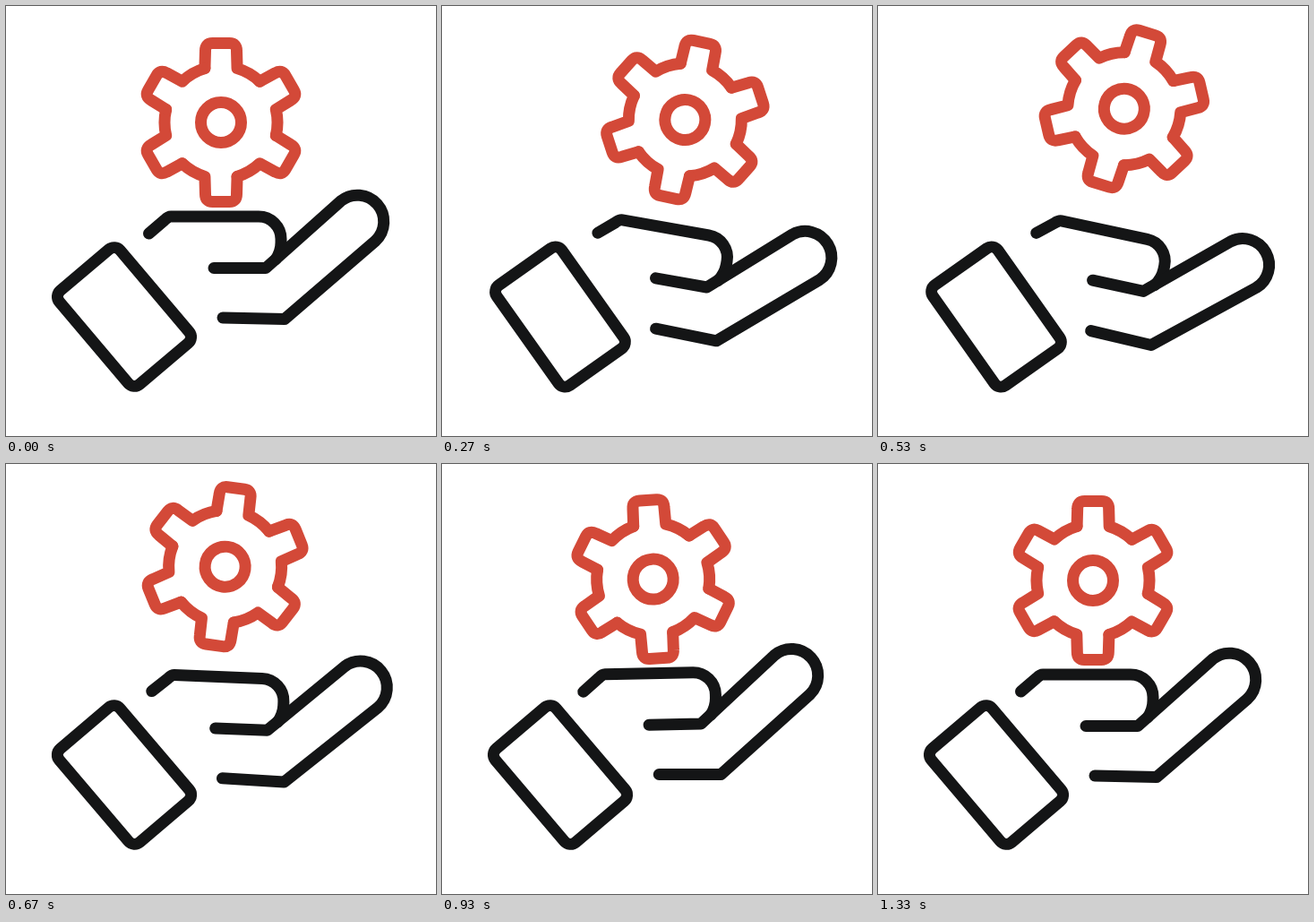
An HTML page that plays this animation: 480x480 px, repeating every 1530 ms.

```html
<!DOCTYPE html>
<html lang="en">
<head>
<meta charset="utf-8">
<title>Hand and gear</title>
<style>
  html, body { margin: 0; width: 100%; height: 100%; overflow: hidden; background: #fff; }
  svg { display: block; width: 100%; height: 100%; }
  g { fill: none; stroke: #141516; stroke-width: 13; stroke-linecap: round; stroke-linejoin: round; }
  #gear { stroke: #d34938; }
</style>
</head>
<body>
<svg viewBox="0 0 480 480">
  <g id="cuff"><rect x="-44.5" y="-68.5" width="89" height="137" rx="9"/></g>
  <g id="hand">
    <path d="M159.5 254 L177 239 Q181 235 184 235 H282 A25 25 0 0 1 307 260 V264 Q307 274 301 283"/>
    <path d="M232 292.5 H290 L373.6 217.8 A29.5 29.5 0 0 1 412.4 262.2 L311 349.5 L242 348"/>
  </g>
  <g id="gear"><path id="tooth"/><circle r="22.5"/></g>
</svg>
<script>
const LOOP = 1530, FPS = 30;
const RISE = 11, DROP = 15.6, END = 40;   // in steps of 1/30 s
const HALF = (END - DROP) / 3, DAMP = 0.44;

const $ = id => document.getElementById(id);
const move = (id, transform) => $(id).setAttribute("transform", transform);
const ease = p => (1 - Math.cos(Math.PI * p)) / 2;

// Rises to 1, holds, then swings back and forth with falling strength.
function swing(step) {
  if (step <= 0 || step >= END) return 0;
  if (step < DROP) return ease(Math.min(1, step / RISE));
  const p = (step - DROP) / HALF, n = Math.floor(p);
  const from = (-DAMP) ** n, to = n < 2 ? (-DAMP) ** (n + 1) : 0;
  return from + (to - from) * ease(p - n);
}

// One toss of the gear, from 0 up to 1 and back.
const toss = step => step > 5 && step < 23 ? Math.sin(Math.PI * (step - 5) / 18) : 0;

// Six copies of one tooth and the arc that follows it.
const tooth = $("tooth");
const rootX = 63 * Math.sin(Math.PI / 10.8), rootY = -63 * Math.cos(Math.PI / 10.8);
const nextX = -rootX / 2 - rootY * Math.sin(Math.PI / 3);
const nextY = rootY / 2 - rootX * Math.sin(Math.PI / 3);
tooth.setAttribute("d", `M${-rootX} ${rootY} L-17.5 -80 Q-17.5 -88.5 -9.5 -88.5
  H9.5 Q17.5 -88.5 17.5 -80 L${rootX} ${rootY} A63 63 0 0 1 ${nextX} ${nextY}`);
for (let a = 60; a < 360; a += 60) {
  const copy = tooth.cloneNode();
  copy.removeAttribute("id");
  copy.setAttribute("transform", `rotate(${a})`);
  $("gear").append(copy);
}

const start = performance.now();

function draw() {
  const t = (performance.now() - start) % LOOP;
  const tick = Math.floor(t / 10) * 10 + 5;   // steps fall on whole hundredths
  const step = Math.min(END, Math.floor(tick * FPS / 1000));
  const tilt = 12.2 * swing(step), hop = toss(step);

  move("hand", `rotate(${tilt} 171 335)`);
  move("cuff", `translate(132 347) rotate(${5.5 * swing(step + 0.8) - 40.3})`);
  // The gear rides on the hand, but turns by its own amount.
  move("gear", `translate(${-7 * hop} ${-36.5 * hop}) rotate(${tilt} 171 335)
    translate(240 130) rotate(${17 * swing(step - 1) - tilt})`);
  requestAnimationFrame(draw);
}
draw();
</script>
</body>
</html>
```
